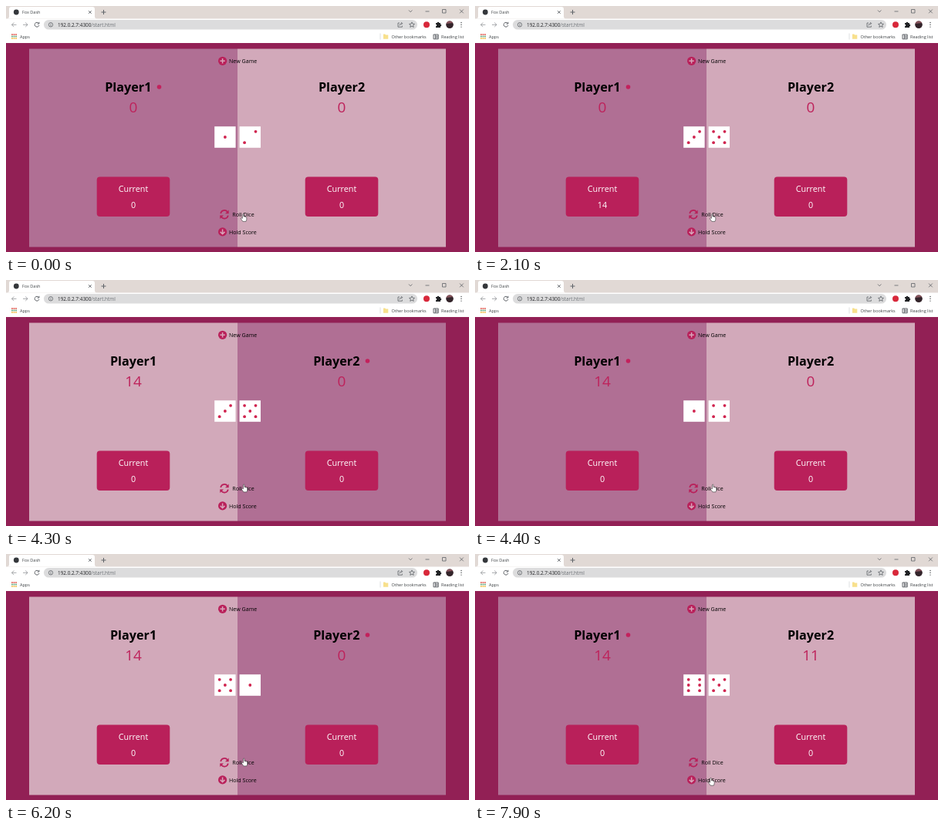
Recreate the animation shown at these times as an HTML page. Size 600 px wide and 319 px high, loop 8 s.

```html
<!DOCTYPE html>
<html lang="en">
<head>
<meta charset="utf-8">
<title>Dice game</title>
<style>
  html, body { margin: 0; width: 100%; height: 100%; overflow: hidden; }
  svg { display: block; width: 100%; height: 100%; font-family: "Open Sans", "Noto Sans", sans-serif; }
  .mid { text-anchor: middle; }
  .name { font-size: 16.2px; font-weight: 700; }
  .score { font-size: 19px; fill: #be225b; }
  .box { font-size: 10.8px; font-weight: 500; fill: #fff; }
  .label { font-size: 7.1px; font-weight: 500; }
  .ui { font-size: 5.5px; fill: #3c4043; }
  .line { fill: none; stroke: #5f6368; stroke-width: 1; }
  .thin { stroke-width: .8; }
  .accent { fill: #b9205a; }
  .sign { fill: none; stroke: #d9a5ba; stroke-width: 1.5; }
</style>
</head>
<body>
<svg viewBox="0 0 600 319">
  <!-- tab strip -->
  <rect width="600" height="17" fill="#e1d9d5"/>
  <path d="M1 16.5q3 0 3-3V4q0-3 3-3H112q3 0 3 3v9.500q0 3 3 3z" fill="#fff"/>
  <circle cx="13.300" cy="8" r="3.400" fill="#34373b"/>
  <text class="ui" x="21" y="10">Fox Dash</text>
  <path class="line" d="M107 6.200l3.600 3.600m0-3.600l-3.600 3.600M123.500 8h6m-3-3v6"/>
  <path class="line thin" d="M522 5.500l2.200 2.300 2.200-2.300M543.500 7h5M565.500 4.500h4.500v4.500h-4.500zM588 4.500l4.800 4.800m0-4.800l-4.800 4.800"/>
  <!-- toolbar -->
  <rect y="16.500" width="600" height="32" fill="#fff"/>
  <rect x="49" y="18" width="484" height="12.600" rx="6.300" fill="#dcdcdd"/>
  <path class="line" d="M13.500 24.300h-6m2.800-2.800l-2.800 2.800 2.800 2.800M22 24.300h6m-2.800-2.800l2.800 2.800-2.800 2.800" opacity=".55"/>
  <path class="line" stroke-width="1.200" d="M42.300 22.300a2.900 2.900 0 1 0 .6 2.700M42.900 20.800v2.300h-2.300"/>
  <g class="line thin">
    <circle cx="58" cy="24.300" r="2.700"/>
    <path d="M58 23.800v1.900m0-3v.5"/>
    <path d="M498 0m12 22h-2v5.200h5.400v-1.600M509.800 25.400q.3-2.800 3.700-2.800m-1.500-1.700l1.700 1.700-1.700 1.700"/>
    <path d="M526 20.900l1 2.300 2.500.2-1.900 1.600.6 2.400-2.200-1.300-2.200 1.300.6-2.400-1.900-1.600 2.500-.2z"/>
  </g>
  <text x="67" y="26.500" font-size="6.400" fill="#202124">192.0.2.7:4300<tspan fill="#6b6f74">/start.html</tspan></text>
  <circle cx="545" cy="24.300" r="4" fill="#d8283a"/>
  <path d="M557 22h1.700a1.300 1.300 0 0 1 2.600 0h1.700v1.700a1.300 1.300 0 0 1 0 2.600v1.700h-6v-1.800a1.200 1.200 0 0 0 0-2.400z" fill="#202124"/>
  <circle cx="575" cy="24.300" r="4.800" fill="#33242a"/>
  <path d="M570.500 23a4.800 4.800 0 0 1 8.800-1.100z" fill="#87545c"/>
  <path d="M590 21.500v.01m0 2.790v.01m0 2.790v.01" stroke="#3c4043" stroke-width="1.400" stroke-linecap="round"/>
  <!-- bookmarks -->
  <g id="apps"></g>
  <text class="ui" x="18" y="41.500">Apps</text>
  <path d="M485 35.500v8" stroke="#cfd1d4" stroke-width=".7"/>
  <path d="M489 36.500h2.300l.8.900h3.200v5.400h-6.300z" fill="#f8e08c"/>
  <text class="ui" x="499.500" y="41.500">Other bookmarks</text>
  <path class="line" d="M554 37h6.200v5.800h-6.200zM556.300 37v5.800M556.300 39h3.500m-3.500 1.900h3.500"/>
  <text class="ui" x="564" y="41.500">Reading list</text>

  <!-- game -->
  <rect y="48" width="600" height="271" fill="#922055"/>
  <g id="players"></g>
  <g id="dice"></g>

  <circle class="accent" cx="280.600" cy="71.300" r="5.600"/>
  <path class="sign" d="M277.400 71.300h6.400m-3.200-3.200v6.400"/>
  <text class="label" x="289" y="73.900">New Game</text>

  <path d="M278.200 269a4.900 4.900 0 0 1 8.800-2M287.800 271.600a4.900 4.900 0 0 1-8.800 2" fill="none" stroke="#b9205a" stroke-width="1.700"/>
  <path class="accent" d="M288.700 264.500v4.700h-4.700zM277.300 276.100v-4.700h4.700z"/>
  <text class="label" x="293.300" y="272.900">Roll Dice</text>

  <circle class="accent" cx="280.600" cy="292.900" r="5.600"/>
  <path class="sign" d="M280.600 289.600v6m-2.900-2.700l2.900 2.900 2.900-2.900"/>
  <text class="label" x="289" y="295.500">Hold Score</text>

  <path id="hand" d="M-1.600 .9V-4q0-.9.8-.9t.8.900v2.500q1-.6 1.300.3 1-.5 1.300.4 1.200-.3 1.200.8v2.200q0 1-.8 2.700h-4.200q-.8-1.500-2.300-3.300-.5-.9.300-1.200.8-.2 1.600.5z" fill="#fff" stroke="#222" stroke-width=".55"/>
</svg>
<script>
const $ = id => document.getElementById(id);
const circle = (x, y, r, fill) => `<circle cx="${x}" cy="${y}" r="${r}" fill="${fill}"/>`;
const text = (cls, x, y, s) => `<text class="mid ${cls}" x="${x}" y="${y}">${s}</text>`;
const grid = f => Array.from({ length: 9 }, (_, i) => f(i % 3 - 1, Math.floor(i / 3) - 1)).join("");

const LOOP = 8000;

// each move is a roll of two dice, or a hold when no dice are given
const moves = [
  { at: 600, dice: [2, 4] },
  { at: 1600, dice: [3, 5] },
  { at: 3000 },
  { at: 4400, dice: [1, 4] },
  { at: 5100, dice: [3, 6] },
  { at: 6000, dice: [5, 1] },
  { at: 6900, dice: [6, 5] },
  { at: 7850 }
];

// play the game up to time t; a rolled 1 loses the turn
function play(t) {
  const game = { active: 0, totals: [0, 0], current: 0, dice: [1, 2] };
  for (const { at, dice } of moves) {
    if (at > t) break;
    if (dice) game.dice = dice;
    else game.totals[game.active] += game.current;
    if (dice && !dice.includes(1)) {
      game.current += dice[0] + dice[1];
    } else {
      game.current = 0;
      game.active = 1 - game.active;
    }
  }
  return game;
}

function player(i, { active, totals, current }) {
  const on = active === i, left = 30 + 270 * i, x = left + 135;
  return `<rect x="${left}" y="55.5" width="270" height="257" fill="${on ? "#b06f94" : "#d2a9ba"}"/>` +
    text("name", on ? x - 6.7 : x, 110.8, "Player" + (i + 1)) +
    (on ? circle(x + 33.5, 105, 2.8, "#c3215c") : "") +
    text("score", x, 138.4, totals[i]) +
    `<rect class="accent" x="${x - 47.3}" y="221.5" width="94.6" height="51.5" rx="4"/>` +
    text("box", x, 240.7, "Current") + text("box", x, 262, on ? current : 0);
}

function hasPip(n, x, y) {
  if (!x) return !y && n % 2 === 1;
  if (!y) return n === 6;
  return n > (x === y ? 3 : 1);
}

const die = (n, cx) =>
  `<rect x="${cx - 13.7}" y="156.2" width="27.4" height="27.6" fill="#fff"/>` +
  grid((x, y) => hasPip(n, x, y) ? circle(cx + x * 7.2, 170 + y * 7.2, 1.9, "#d0244f") : "");

// eased progress from 0 to 1 between two times
function glide(t, from, to) {
  const k = Math.min(1, Math.max(0, (t - from) / (to - from)));
  return k * k * (3 - 2 * k);
}

function pointer(t) {
  const down = glide(t, 2300, 2750), back = glide(t, 3500, 4000), again = glide(t, 7200, 7600);
  const x = 308 + back - 2.7 * again;
  const y = 274.5 + 24 * down - 28.5 * back + 25.3 * again;
  return `translate(${x} ${y})`;
}

$("apps").innerHTML = grid((x, y) =>
  circle(10.5 + x * 2.5, 39.5 + y * 2.5, 0.9, ["#e0483e", "#4f9a6c", "#f2b636"][y + 1]));

function draw(t) {
  const game = play(t);
  $("players").innerHTML = player(0, game) + player(1, game);
  $("dice").innerHTML = die(game.dice[0], 283.9) + die(game.dice[1], 316.3);
  $("hand").setAttribute("transform", pointer(t));
}

const start = performance.now();
function tick() {
  draw((performance.now() - start) % LOOP);
  requestAnimationFrame(tick);
}
tick();
</script>
</body>
</html>
```
